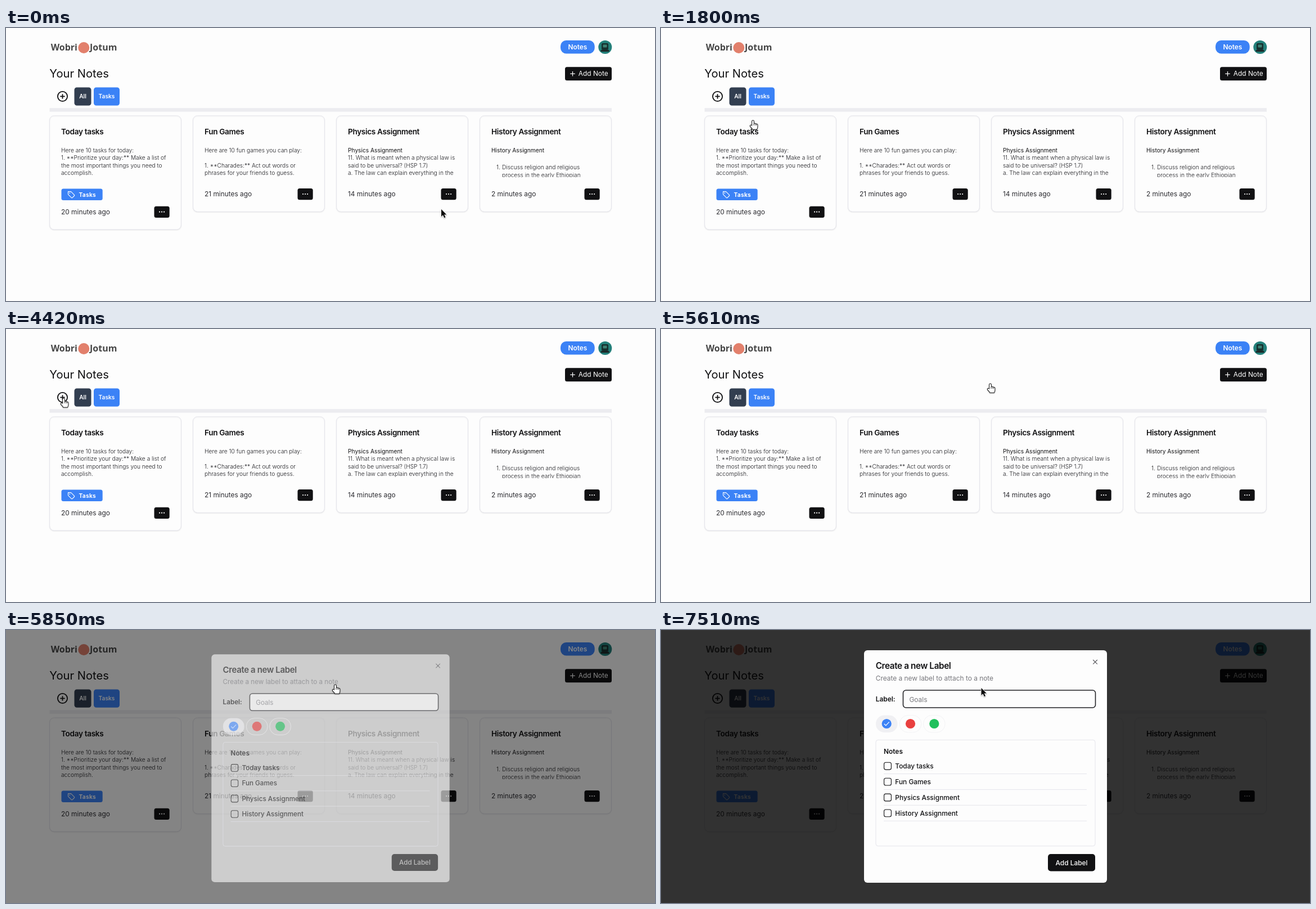
An HTML page with a canvas that plays this animation: 1154x485 px, repeating every 8 s.

```html
<!DOCTYPE html>
<html lang="en">
<head>
<meta charset="utf-8">
<title>Notes board</title>
<style>
  html, body { margin: 0; width: 100%; height: 100%; overflow: hidden; background: #fdfdfd; }
  canvas { display: block; width: 1154px; height: 485px; }
</style>
</head>
<body>
<canvas id="stage" width="1154" height="485"></canvas>
<script>
const ctx = document.getElementById('stage').getContext('2d');
const W = 1154, H = 485, LOOP = 8000;
const PAPER = '#fdfdfd', INK = '#111113', BLUE = '#3b82f6', LINE = '#e5e5ec';
const SANS = 'Inter, sans-serif';
const XS = 10.2, SM = 11.9, MD = 13.6, LG = 15.3, XL = 20.2;

function box(x, y, w, h, r, fill, stroke, lineWidth = 1) {
  ctx.beginPath();
  ctx.roundRect(x, y, w, h, r);
  if (fill) { ctx.fillStyle = fill; ctx.fill(); }
  if (stroke) { ctx.strokeStyle = stroke; ctx.lineWidth = lineWidth; ctx.stroke(); }
}

function disc(x, y, r, fill) {
  ctx.beginPath();
  ctx.arc(x, y, r, 0, Math.PI * 2);
  ctx.fillStyle = fill;
  ctx.fill();
}

function line(color, width, ...points) {
  ctx.beginPath();
  points.forEach(([x, y]) => ctx.lineTo(x, y));
  ctx.strokeStyle = color;
  ctx.lineWidth = width;
  ctx.stroke();
}

function text(str, x, y, size, { weight = 400, color = INK, align = 'left', track = 0, family = SANS } = {}) {
  ctx.font = `${weight} ${size}px ${family}`;
  ctx.letterSpacing = `${track * size}px`;
  ctx.textAlign = align;
  ctx.fillStyle = color;
  ctx.fillText(str, x, y);
}

function plus(x, y, r, color, width) {
  line(color, width, [x - r, y], [x + r, y]);
  line(color, width, [x, y - r], [x, y + r]);
}

function button(label, x, y, w, h, r, fill, size, weight) {
  box(x, y, w, h, r, fill);
  text(label, x + w / 2, y + h / 2 + size * 0.36, size, { weight, color: '#fff', align: 'center' });
}

function header() {
  const logo = { weight: 800, color: '#474747', family: '"Noto Sans", sans-serif' };
  text('Wobri', 127, 40, 16, { ...logo, align: 'right' });
  text('Jotum', 149, 40, 16, logo);
  disc(138.3, 35, 10, '#e2806c');

  button('Notes', 986, 22, 60.7, 23.5, 10, BLUE, SM, 600);
  disc(1065.3, 34, 12, '#23807a');
  box(1059, 27, 12, 12, 2, '#17302f');
  box(1061.5, 29.5, 7, 5, 1, '#3d8173');
  box(1057.5, 39, 15, 3, 1, '#1c2a2a');

  text('Your Notes', 77.3, 88, XL);
  box(994, 69.3, 83, 24, 3.5, INK);
  plus(1007.5, 81.3, 4.3, '#fff', 1.2);
  text('Add Note', 1017.8, 85.4, SM, { color: '#fff' });

  ctx.beginPath();
  ctx.arc(100.5, 121.5, 8.6, 0, Math.PI * 2);
  ctx.strokeStyle = INK;
  ctx.lineWidth = 1.8;
  ctx.stroke();
  plus(100.5, 121.5, 4.2, INK, 1.8);
  button('All', 121.5, 105.5, 30, 32.2, 4.5, '#323e50', XS, 600);
  button('Tasks', 156, 105.5, 46, 32.2, 4.5, BLUE, XS, 600);
  box(77.5, 142.3, 999.5, 6.5, 0, '#ececf0');
}

function tag(x, y) {
  box(x, y, 73.2, 20.3, 3.5, BLUE);
  ctx.save();
  ctx.translate(x + 11, y + 4);
  ctx.strokeStyle = '#fff';
  ctx.lineWidth = 1.1;
  ctx.lineJoin = 'round';
  ctx.stroke(new Path2D('M1 1H6L12 7Q12.6 7.7 12 8.4L8.4 12Q7.7 12.6 7 12L1 6Z'));
  disc(3.7, 3.7, 0.9, '#fff');
  ctx.restore();
  text('Tasks', x + 31, y + 13.9, XS, { weight: 700, color: '#fff', track: 0.025 });
}

const cards = [
  { title: 'Today tasks', age: '20 minutes ago', tagged: true,
    lines: ['Here are 10 tasks for today:', '1. **Prioritize your day:** Make a list of',
      'the most important things you need to', 'accomplish.'] },
  { title: 'Fun Games', age: '21 minutes ago',
    lines: ['Here are 10 fun games you can play:', '', '1. **Charades:** Act out words or',
      'phrases for your friends to guess.'] },
  { title: 'Physics Assignment', age: '14 minutes ago', heading: true,
    lines: ['Physics Assignment', '11. What is meant when a physical law is',
      'said to be universal? (HSP 1.7)', 'a. The law can explain everything in the'] },
  { title: 'History Assignment', age: '2 minutes ago', heading: true, list: true,
    lines: ['History Assignment', 'Discuss religion and religious', 'process in the early Ethiopian'] },
];

function card({ title, age, lines, tagged, heading, list }, i) {
  const x = 77.5 + 255 * i, left = x + 20.5;
  const bottom = tagged ? 358 : 326.3;
  ctx.save();
  ctx.shadowColor = 'rgba(0,0,0,.07)';
  ctx.shadowBlur = 2;
  ctx.shadowOffsetY = 1;
  box(x, 155.8, 234, bottom - 155.8, 8, PAPER, LINE);
  ctx.restore();
  text(title, left, 188.5, MD, { weight: 600, track: -0.025 });

  ctx.save();
  ctx.beginPath();
  ctx.rect(left, 200, 195, 64.8);
  ctx.clip();
  lines.forEach((str, n) => {
    const head = heading && n === 0;
    const nested = list && n > 0;
    const y = 220.6 + 13.6 * n + (nested ? 16.8 : 0);
    text(str, left + (nested ? 19 : 0), y, XS, { weight: head ? 400 : 300, color: head ? INK : '#1c1c20' });
    if (nested && n === 1) text('1.', left + 16, y, XS, { weight: 300, align: 'right' });
  });
  ctx.restore();

  if (tagged) tag(left + 0.5, 285.6);
  const mid = bottom - 31.3;
  text(age, left, mid + 4.3, SM, { color: '#2b2b30' });
  box(x + 186, mid - 10, 27.2, 20.3, 3.5, INK);
  [-4, 0, 4].forEach(d => disc(x + 199.6 + d, mid, 1.1, '#fff'));
}

function page() {
  ctx.fillStyle = PAPER;
  ctx.fillRect(0, 0, W, H);
  header();
  cards.forEach(card);
}

function dialog(caretOn) {
  box(361, 36, 432, 413, 6, PAPER);
  text('Create a new Label', 381.7, 69.3, LG, { weight: 600, track: -0.025 });
  text('Create a new label to attach to a note', 381.7, 89.6, SM, { color: '#77777c' });
  line('#55555a', 1.1, [768.2, 53], [775.8, 60.6]);
  line('#55555a', 1.1, [775.8, 53], [768.2, 60.6]);

  text('Label:', 381.7, 126.8, SM, { weight: 600 });
  box(430.5, 107, 342, 31, 5, PAPER, '#222226', 1.6);
  text('Goals', 441.5, 127.6, SM, { color: '#77777c' });
  if (caretOn) line(INK, 1, [442.5, 116], [442.5, 130]);

  [BLUE, '#e9403f', '#20c05c'].forEach((color, i) => {
    const x = 401 + 42.3 * i;
    box(x - 19, 151.5, 38.5, 30.5, 15, i ? null : '#f0f0f3', i ? '#f3f3f5' : null);
    disc(x + 0.2, 166.5, 8.6, color);
  });
  line('#fff', 1.2, [396.8, 166.8], [399.8, 169.7], [405.8, 163.4]);

  box(382, 195.3, 390, 188.5, 4, null, LINE);
  text('Notes', 396, 219.5, SM, { weight: 600 });
  cards.forEach(({ title }, i) => {
    const y = 241.6 + 27.9 * i;
    box(396.6, y - 6.3, 12.8, 12.8, 3, null, INK, 1.1);
    text(title, 416.3, y + 4.3, SM, { weight: 500 });
    line(LINE, 1, [396, y + 13.9], [757, y + 13.9]);
  });
  button('Add Label', 688, 398, 84, 30.5, 5, INK, SM, 500);
}

// Opening progress of the dialog, shown in hard steps.
const openness = t => t < 5790 ? 0 : t < 5850 ? 0.1 : t < 5960 ? 0.6 : 1;

function overlay(t) {
  const p = openness(t);
  if (!p) return;
  ctx.fillStyle = `rgba(0,0,0,${0.8 * p})`;
  ctx.fillRect(0, 0, W, H);
  const scale = 0.95 + 0.05 * p;
  ctx.save();
  ctx.globalAlpha = p;
  ctx.translate(W / 2, H / 2 + 8 * (1 - p));
  ctx.scale(scale, scale);
  ctx.translate(-W / 2, -H / 2);
  dialog((t >= 5960 && t < 6400) || (t >= 6910 && t < 7510));
  ctx.restore();
}

// time, x, y, 1 = pointing hand
const path = [
  [0, 774, 322, 0], [330, 774, 322, 0], [930, 300, 275, 0], [1040, 300, 275, 0],
  [1320, 232, 258, 0], [1540, 232, 258, 0], [1800, 163.5, 165, 1], [1880, 163.5, 165, 1],
  [2060, 110, 100, 0], [2220, 36, 52, 0], [2370, 74, 79, 0], [2420, 74, 79, 0],
  [2600, 98, 107, 0], [3000, 98, 107, 0], [3030, 90, 98, 0], [3360, 90, 98, 0],
  [3490, 62, 1, 0], [3700, 62, 1, 0], [4050, 126, 357, 0], [4420, 102.5, 124, 1],
  [4600, 102.5, 124, 1], [4740, 105, 132, 1], [4900, 105, 132, 1], [5280, 592, 98, 1],
  [5580, 592, 98, 1], [5610, 585.5, 98, 1], [6290, 585.5, 98, 1], [6400, 569.5, 103, 0],
];
const arrow = new Path2D('M0 0V13L3 10.3L5.3 15.2L7.5 14.2L5.2 9.5H9.3Z');
const hand = new Path2D('M-1.4 8.5V1a1.4 1.4 0 0 1 2.8 0V5.2q1.4 -.9 2.4 .3q1.5 -.6 2.2 .5' +
  'q1.8 -.3 1.9 1.3v3.2q0 2 -1.3 4.3h-7q-1 -2 -4 -5q-.8 -1.8 .6 -2q1 0 2.8 1.5Z');

function cursor(t) {
  const i = path.findLastIndex(k => k[0] <= t);
  const [t0, x0, y0, pointing] = path[i];
  const [t1, x1, y1] = path[i + 1] || [LOOP, x0, y0];
  const f = (t - t0) / (t1 - t0);
  ctx.save();
  ctx.translate(x0 + (x1 - x0) * f, y0 + (y1 - y0) * f);
  ctx.lineJoin = 'round';
  const shape = pointing ? hand : arrow;
  ctx.lineWidth = pointing ? 2 : 1.6;
  ctx.strokeStyle = pointing ? '#1a1a1a' : '#fff';
  ctx.fillStyle = pointing ? '#fff' : '#0a0a0a';
  ctx.shadowColor = 'rgba(0,0,0,.3)';
  ctx.shadowBlur = 2;
  ctx.shadowOffsetY = 1;
  ctx.stroke(shape);
  ctx.shadowColor = 'transparent';
  ctx.fill(shape);
  if (pointing) {
    line('#1a1a1a', 0.8, [1.4, 5], [1.4, 8]);
    line('#1a1a1a', 0.8, [3.8, 5.5], [3.8, 8]);
    line('#1a1a1a', 0.8, [6, 6], [6, 8.3]);
  }
  ctx.restore();
}

const start = performance.now();
function frame() {
  const t = (performance.now() - start) % LOOP;
  page();
  overlay(t);
  cursor(t);
  requestAnimationFrame(frame);
}
frame();
</script>
</body>
</html>
```
